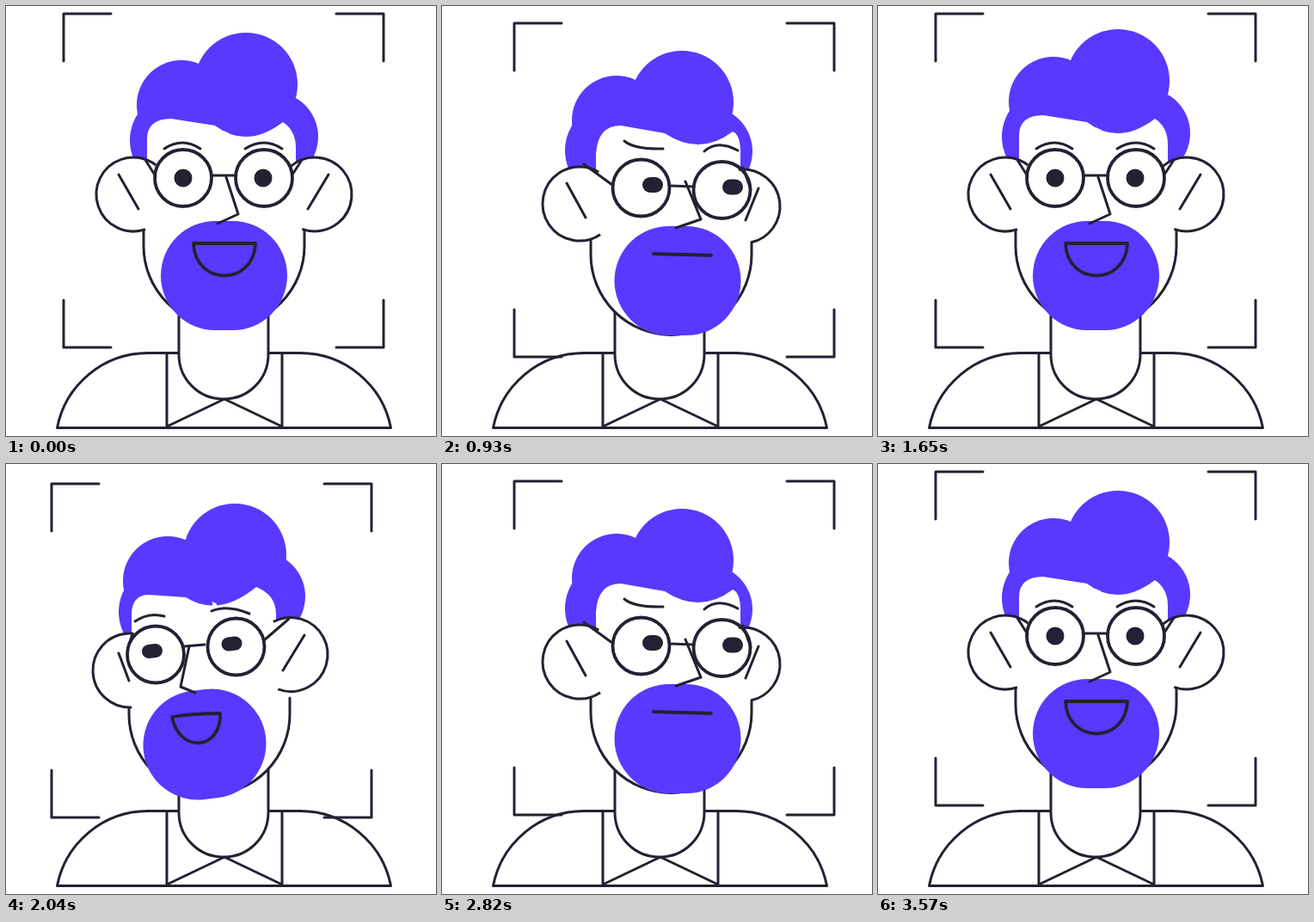
An HTML page for the animation above (3.75 s loop, 500 px wide and 500 px high).

```html
<!DOCTYPE html>
<html lang="en">
<head>
<meta charset="utf-8">
<title>Face scan</title>
<style>
html, body { margin: 0; width: 100%; height: 100%; overflow: hidden; background: #fff; }
svg { display: block; width: 100vmin; height: 100vmin; }
.line { fill: none; stroke: #222233; stroke-width: 3; stroke-linecap: round; stroke-linejoin: round; }
.thick { stroke-width: 3.8; }
.white { fill: #fff; }
.hair { fill: #5a38ff; }
.dot { stroke: #222233; stroke-linecap: round; }
.beard { stroke: #5a38ff; stroke-linecap: round; }
</style>
</head>
<body>
<svg id="stage" viewBox="0 0 500 500"></svg>
<script>
const stage = document.getElementById('stage');
const parts = [];

function make(parent, tag, attrs) {
  const el = document.createElementNS('http://www.w3.org/2000/svg', tag);
  for (const key in attrs) el.setAttribute(key, attrs[key]);
  return parent.appendChild(el);
}

// Every moving part lists five poses: front, turning, left, right, tilted.
function part(el, poses, apply) {
  parts.push({ el, poses, apply });
}
const shape = (parent, cls, poses) =>
  part(make(parent, 'path', { class: cls }), poses, (el, s) => el.setAttribute('d', s));
const disc = (parent, cls, r, poses) =>
  part(make(parent, 'circle', { class: cls, r }), poses, (el, s) => el.setAttribute('transform', `translate(${s})`));
const placed = (parent, cls, d, poses) =>
  part(make(parent, 'path', { class: cls, d }), poses, (el, s) => el.setAttribute('transform', s));
// Thick round-capped line: "width path"
const capsule = (parent, cls, poses) =>
  part(make(parent, 'path', { class: cls }), poses, (el, s) => {
    const i = s.indexOf(' ');
    el.setAttribute('stroke-width', s.slice(0, i));
    el.setAttribute('d', s.slice(i + 1));
  });
// Open circle: "x y startAngle sweep"
const ear = (parent, poses) =>
  part(make(parent, 'circle', { class: 'line white', r: 43, pathLength: 360, style: 'fill:#fff;stroke-linecap:butt' }), poses, (el, s) => {
    const [x, y, start, sweep] = s.split(' ');
    el.setAttribute('transform', `translate(${x} ${y}) rotate(${start})`);
    el.setAttribute('stroke-dasharray', `${sweep} 360`);
  });

// Body and neck
make(stage, 'path', { class: 'line', d: 'M59.5 490.5A107.5 107.5 0 0 1 165 403.5H342A107.5 107.5 0 0 1 447.5 490.5ZM187 404V489L254 457L321 489V404' });
const neck = 'M201 340L201 405C201 434 224 457 253 457C282 457 305 434 305 405L305 340';
shape(stage, 'line neck', [neck, neck, neck, neck,
  'M194.5 340L200.5 405C201 434 224 457 253 457C282 457 304 434 304 405L298 338']);
stage.querySelector('.neck').style.fill = '#fff';

const head = make(stage, 'g', {});
const hair = make(head, 'g', {});
disc(hair, 'hair', 60, ['279 91', '266 106', '295 91', '279 112', '215 107']);
disc(hair, 'hair', 52, ['204 115', '188 136', '213 114', '203 133', '147 151']);
disc(hair, 'hair', 52, ['311 152', '296 154', '318 143', '309 169', '258 160']);
disc(hair, 'hair', 55, ['199 156', '186 172', '206 155', '198 168', '155 198']);
shape(hair, 'white', [
  'M164 230L164 155Q164 131 192 131L243 139Q280 167 322 135Q337 145 337 165L337 230Z',
  'M146 250L146 175Q146 153 165 152L209 155Q247 179 291 143Q314 152 314 175L314 250Z',
  'M161 230L161 150Q161 132 178 132L219 139Q258 168 302 135Q325 148 325 160L325 230Z',
  'M179 250L179 172Q181 139 208 139L259 148Q300 175 338 146Q348 150 347 175L347 250Z',
  'M136 262L117 190Q114 147 135 145L183 141Q228 161 261 116Q280 128 286 165L300 235Z']);

placed(head, 'line face', 'M-93.5 -19V0A93.5 93.5 0 0 0 93.5 0V-19', [
  'translate(253.5 279) rotate(0)', 'translate(236.5 291) rotate(0)', 'translate(238.5 279) rotate(0)',
  'translate(266.5 289) rotate(0)', 'translate(230 271) rotate(-8)']);
head.querySelector('.face').style.fill = '#fff';

ear(head, ['148 219 71 237', '144 240 87 189', '158 219.5 103 170', '160 230 56 245', '117 264 57 231']);
ear(head, ['359 219 230 240', '331 221.5 242 228', '337 219.5 254 225', '350 233 263 175', '323 212 222 232']);
shape(head, 'line', ['M131 196L154 236', 'M131 220L143 252', 'M147 198L153 230', 'M145 206L167 246', 'M96 245L128 277']);
shape(head, 'line', ['M375 196L351 236', 'M347 199L322 240', 'M357 199L326 237', 'M368 212L353 249', 'M332 185L319 231']);

// Beard and mouth
capsule(head, 'beard', ['127 M243.5 313.5L263.5 313.5', '127 M223 327L239 325', '127 M219 313.5L234 313.5',
  '127 M264 319.5L284 319.5', '127 M226.5 305L246.5 301']);
shape(head, 'line thick', [
  'M218 276C242 276 266 276 290 276C288 326 220 326 218 276Z',
  'M193 294C211 291 230 290 249 290C251 332 202 338 193 294Z',
  'M194.5 291C194.5 277 215.5 277 215.5 291C215.5 305 194.5 305 194.5 291Z',
  'M246 288C268 289 290 289 313 290C290 289 268 289 246 288Z',
  'M202 286C218 273 242 268 268 270C242 268 218 273 202 286Z']);

// Glasses: lenses, bridge, temples
disc(head, 'line thick', 33, ['206 200', '174 221.5', '176 199.5', '231.5 211.5', '162 204']);
disc(head, 'line thick', 33, ['300 200', '267.5 212.5', '270 200', '325.5 214', '254.5 181.5']);
shape(head, 'line', ['M239 197L267 197', 'M208 212L231 210', 'M209 197L237 197', 'M265 209L293 210', 'M195 193L222 186']);
shape(head, 'line', ['M162 179L174 198', 'M147 198L143 210', 'M160 177L145 192', 'M165 184L198 208', 'M130 208L126 222']);
shape(head, 'line', ['M344 179L333 196', 'M329 180L300 205', 'M344 178L303 196', 'M350 188L359 213', 'M286 168L293 183']);

// Pupils, brows, nose
capsule(head, 'dot', ['21 M206 200L206 200', '16 M166 218L174 217', '21 M163 200L163 200',
  '18 M242 208L248 208', '21 M167 221L167 221']);
capsule(head, 'dot', ['21 M299 200L299 200', '16 M258.5 209.5L266.5 208.5', '21 M256 200L256 200',
  '18 M335 210.5L341 210.5', '21 M258 198L258 198']);
shape(head, 'line', ['M184 166Q205 152 226 166', 'M150 183Q166 172 184 177', 'M163 163Q178 155 193 159',
  'M212 157Q224 167 257 166', 'M128 165Q152 167 174 161']);
shape(head, 'line', ['M278 166Q300 152 321 166', 'M239 171Q257 163 283 174', 'M248 160Q265 152 293 166',
  'M305 169Q320 155 344 168', 'M222 151Q246 145 262 128']);
shape(head, 'line', ['M256 199L270 242L246 253', 'M213 212L203 259L220 266', 'M217 198L193 243L223 252',
  'M283 204L301 248L272 258', 'M211 191L236 230L214 245']);

// Viewfinder corners
placed(head, 'line', 'M67 64V9H122M384 9H439V64M439 342V397H384M122 397H67V342', [
  'translate(0 0)', 'translate(-14 14)', 'translate(-20 0)', 'translate(17 11)', 'translate(-25 0)']);

const easeIn = k => k * k;
const easeOut = k => k * (2 - k);
const smooth = k => k * k * (3 - 2 * k);

// time, pose, head offset x and y, ease into this key, extra dip on the way
const keys = [
  [0, 0, 0, 0],
  [150, 1, 0, 0, easeIn, 0],
  [270, 2, -2, 0, easeOut, 0],
  [360, 2, 0, 0, smooth, 0],
  [600, 3, 3, -11, smooth, 30],
  [840, 3, 3, -11, smooth, 0],
  [930, 3, 0, 0, easeIn, 0],
  [1080, 4, 0, 0, smooth, 22],
  [1380, 4, 0, 0, smooth, 0],
  [1620, 0, 0, 0, smooth, 0],
  [1890, 0, 0, 0, smooth, 0]
];
const LOOP = 3750, CYCLE = 1890, STEP = 30;

const lerp = (a, b, k) => a + (b - a) * k;
function blend(a, b, k) {
  const to = b.match(/-?[\d.]+/g);
  let i = 0;
  return a.replace(/-?[\d.]+/g, n => +lerp(+n, +to[i++], k).toFixed(2));
}

function draw(time) {
  const u = Math.floor(time % LOOP / STEP) * STEP % CYCLE;
  const i = keys.findIndex(key => key[0] > u);
  const [t0, from, x0, y0] = keys[i - 1];
  const [t1, to, x1, y1, ease, dip] = keys[i];
  const raw = (u - t0) / (t1 - t0);
  const k = ease(raw);
  for (const p of parts) p.apply(p.el, blend(p.poses[from], p.poses[to], k));
  const y = lerp(y0, y1, k) + dip * Math.sin(Math.PI * raw);
  head.setAttribute('transform', `translate(${lerp(x0, x1, k)} ${y})`);
  // Hair springs up as the head comes to rest
  const lift = u < 1620 ? smooth(Math.max(0, (u - 1500) / 120)) : smooth(Math.max(0, (1680 - u) / 60));
  hair.setAttribute('transform', `translate(0 ${-8 * lift})`);
}

const start = performance.now();
function tick() {
  draw(performance.now() - start);
  requestAnimationFrame(tick);
}
tick();
</script>
</body>
</html>
```
